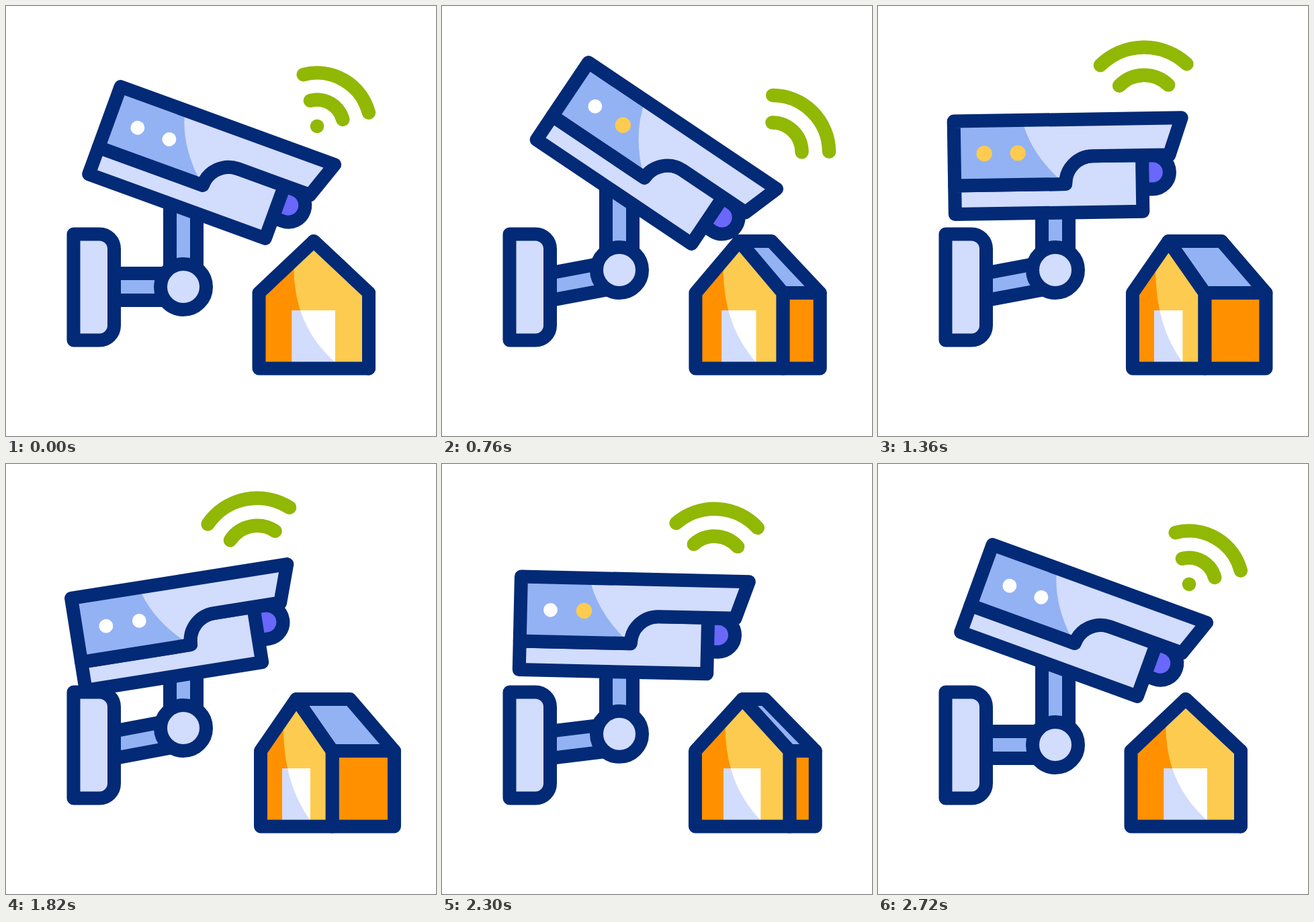
An HTML page that plays this animation: 640x640 px, repeating every 3 s.

```html
<!DOCTYPE html>
<html lang="en">
<head>
<meta charset="utf-8">
<title>Security camera</title>
<style>
  html, body { margin: 0; height: 100%; overflow: hidden; background: #fff; }
  svg { display: block; width: 100vw; height: 100vh; }
  .ink { stroke: #032a76; stroke-width: 20; stroke-linejoin: round; stroke-linecap: round; }
  .light { fill: #d2dcfd; }
  .mid { fill: #93b2f3; }
  .orange { fill: #ff9100; }
  .yellow { fill: #fdcb50; }
  .none { fill: none; }
  .tube { stroke: #032a76; stroke-width: 60; }
  .core { stroke: #93b2f3; stroke-width: 20; }
  #wifi path { fill: none; stroke: #91b804; stroke-width: 20.5; stroke-linecap: round; }
</style>
</head>
<body>
<svg viewBox="0 0 640 640">
  <clipPath id="shade"><path d="M0 427L52 377.6C49 450 75 500 124 540H0Z"/></clipPath>

  <g id="wifi"><path/><path/><path/></g>

  <line class="tube arm"/><line class="tube pole"/>
  <line class="core arm"/><line class="core pole"/>
  <circle id="ball" class="ink light" cx="264" r="34"/>

  <g id="camera">
    <path id="lens" class="ink" fill="#6a67fb" d="M279 55.5h16a25 25 0 0 1 0 50h-16z"/>
    <path id="lower" class="ink light"/>
    <path id="visor" class="light"/>
    <path class="mid" d="M0 0H102Q114 52 164 96H0Z"/>
    <path id="visorLine" class="ink none"/>
    <circle id="ledLeft" cx="44.7" cy="48.8"/>
    <circle id="ledRight" cx="94.7" cy="48.8"/>
  </g>

  <path class="ink light" d="M100.5 339.5H139a22 22 0 0 1 22 22V475.5a22 22 0 0 1-22 22H100.5Z"/>

  <path id="roof" class="ink mid"/>
  <path id="side" class="ink orange"/>
  <g id="front">
    <path class="yellow" d="M0 427L81 350L163 427V539.5H0Z"/>
    <path class="orange" d="M0 427L52 377.6C49 450 75 500 124 539.5H0Z"/>
    <path fill="#fff" d="M49 453h64v80h-64z"/>
    <path class="light" clip-path="url(#shade)" d="M49 453h64v80h-64z"/>
  </g>
  <path id="frontLine" class="ink none"/>
</svg>
<script>
const LOOP = 3000, START = 200, END = 2720, PULSES = 5, BLINK = 840;

// Camera angle, pivot, ball height, wifi centre and wifi angle in each pose
const HOME  = { angle: 20, px: 306, py: 305, ball: 418, wx: 463, wy: 179, turn: 30.2 };
const DOWN  = { angle: 33.9, px: 305, py: 296, ball: 393, wx: 491.5, wy: 217.5, turn: 45 };
const ABOVE = { angle: -9, px: 305.2, py: 296, ball: 393, wx: 374, wy: 140, turn: -11.5 };

const $ = id => document.getElementById(id);
const set = (el, attrs) => { for (const k in attrs) el.setAttribute(k, attrs[k]); };
const mix = (a, b, p) => a + (b - a) * p;
const progress = (t, a, b) => Math.min(1, Math.max(0, (t - a) / (b - a)));
const smooth = x => x * x * (3 - 2 * x);
const ease = (t, a, b) => smooth(progress(t, a, b));
const bump = (t, a) => ease(t, a, a + 300) - ease(t, a + 300, a + 600);

function poseAt(t) {
  const down = ease(t, 200, 700), up = ease(t, 1000, 1500), back = ease(t, 2100, 2600);
  const pose = {};
  for (const k in HOME)
    pose[k] = HOME[k] + (DOWN[k] - HOME[k]) * down + (ABOVE[k] - DOWN[k]) * up + (HOME[k] - ABOVE[k]) * back;
  return pose;
}

function drawWifi(t, pose) {
  const active = t >= START && t < END;
  const cycles = active ? (t - START) / (END - START) * PULSES : 0;
  const f = cycles % 1;
  const arcs = [[40 * f, 45], [39.5 + 40 * f, 45], [79.5 + 45 * f, 45 - 4.5 * f]];
  set($('wifi'), { transform: `translate(${pose.wx} ${pose.wy}) rotate(${pose.turn})` });
  arcs.forEach(([radius, half], i) => {
    const r = Math.max(radius, 0.05), a = half * Math.PI / 180;
    const x = r * Math.sin(a), y = -r * Math.cos(a);
    const hidden = i === 0 && cycles >= 1 && f < 0.4;
    set($('wifi').children[i], {
      d: `M${-x} ${y}A${r} ${r} 0 0 1 ${x} ${y}`,
      visibility: hidden ? 'hidden' : 'visible'
    });
  });
}

function drawLed(el, on) {
  set(el, { fill: on ? '#fdcb50' : '#fff', r: on ? 11.7 : 10.4 });
}

function drawCamera(t, pose) {
  const zoom = 14 * (bump(t, 700) + bump(t, 1500));
  const notch = 'H165A41 41 0 0 1 206 55';
  const visor = `M0 96${notch}H${320 - zoom}L${339 - zoom} 0H0Z`;
  set($('camera'), { transform: `translate(${pose.px} ${pose.py}) rotate(${pose.angle}) translate(-190.5 -127.4)` });
  set($('lens'), { transform: `translate(${-zoom})` });
  set($('lower'), { d: `M0 96${notch}H${279.5 - zoom}V138.5H0Z` });
  set($('visor'), { d: visor });
  set($('visorLine'), { d: visor });

  const phase = t >= START && t < END ? (t - START) % BLINK / BLINK : 0;
  drawLed($('ledLeft'), phase > 0.12 && phase < 0.46);
  drawLed($('ledRight'), phase > 0.3 && phase < 0.74);

  const armEnd = mix(HOME.ball, pose.ball, 0.78);
  set($('ball'), { cy: pose.ball });
  document.querySelectorAll('.arm').forEach(el => set(el, { x1: 160, y1: HOME.ball, x2: 264, y2: armEnd }));
  document.querySelectorAll('.pole').forEach(el => set(el, { x1: 264, y1: 255, x2: 264, y2: pose.ball }));
}

function drawHouse(t) {
  const h = smooth(progress(t, 270, 1500) ** 0.62) - ease(t, 1800, 2700);
  const left = mix(376.5, 379, h * h), corner = mix(540, 485.5, h), right = mix(540, 578, h);
  const apex = mix(458, 432, h), ridge = mix(458, 512, h);
  set($('roof'), { d: `M${apex} 350H${ridge}L${right} 427H${corner}Z` });
  set($('side'), { d: `M${corner} 427H${right}V539.5H${corner}Z` });
  set($('front'), { transform: `translate(${left}) scale(${(corner - left) / 163} 1)` });
  set($('frontLine'), { d: `M${left} 427L${apex} 350L${corner} 427V539.5H${left}Z` });
}

function draw() {
  const t = performance.now() % LOOP;
  const pose = poseAt(t);
  drawWifi(t, pose);
  drawCamera(t, pose);
  drawHouse(t);
  requestAnimationFrame(draw);
}
draw();
</script>
</body>
</html>
```
